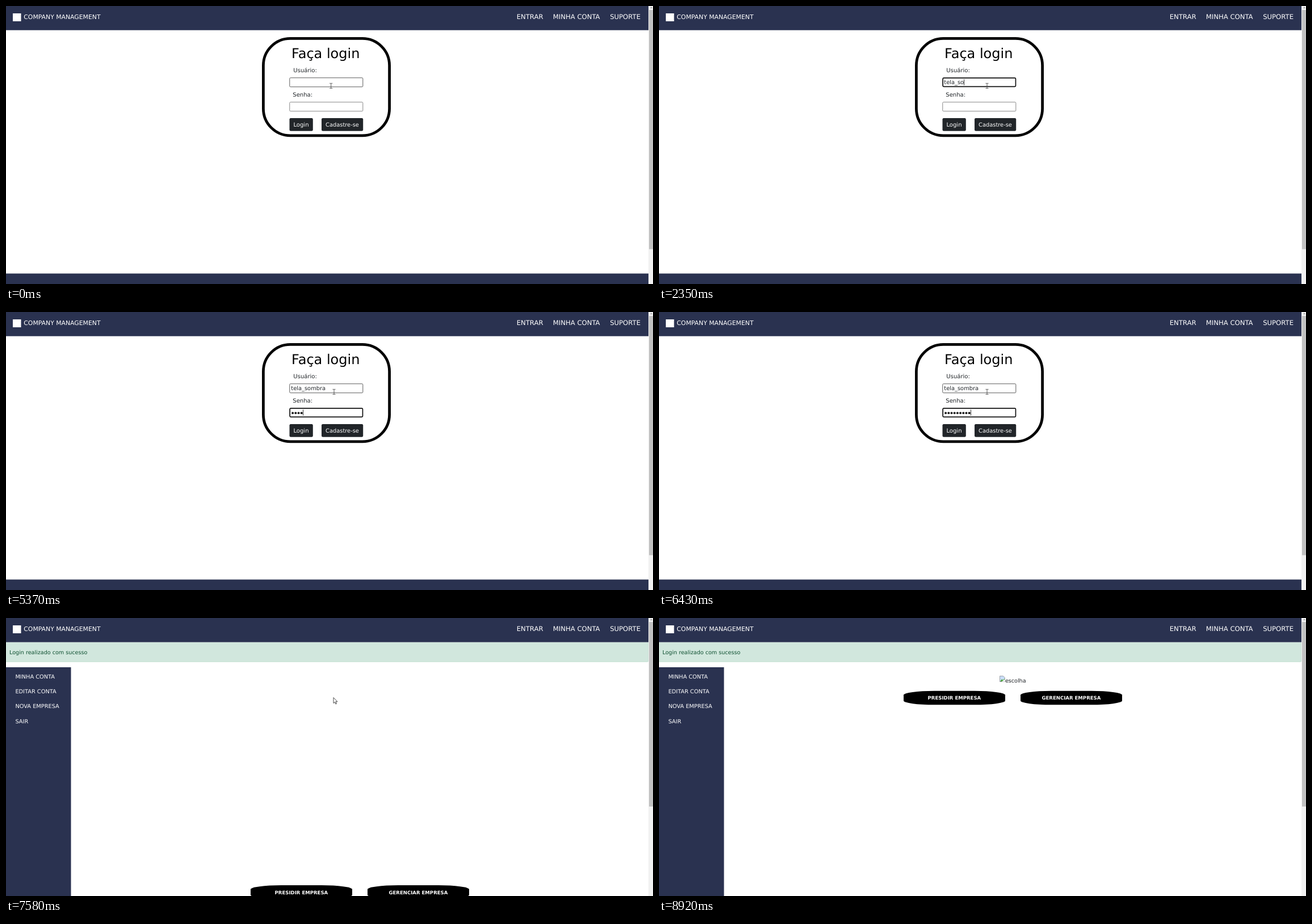
An HTML page that plays this animation: 1140 px wide and 491 px high, repeating every 9780 ms.

```html
<!DOCTYPE html>
<html lang="pt-BR">
<head>
<meta charset="utf-8">
<title>Company Management</title>
<style>
  html, body { margin: 0; width: 100%; height: 100%; overflow: hidden; background: #fff; }
  svg { display: block; width: 1140px; height: 491px; }
  text { font-family: "DejaVu Sans", Verdana, sans-serif; fill: #212529; text-rendering: geometricPrecision; white-space: pre; }
  .light { fill: #fff; }
  .navy { fill: #2a3250; }
  .dark { fill: #212529; }
  .strong { font-weight: bold; text-anchor: middle; }
  .field { fill: #fff; }
</style>
</head>
<body>
<svg viewBox="0 0 1140 491">
  <g id="login">
    <rect x="453.4" y="57.4" width="222.2" height="171.4" rx="47.6" fill="#fff" stroke="#000" stroke-width="4.8"/>
    <rect class="field" id="userBox"/>
    <rect class="field" id="passBox"/>
    <rect class="dark" x="499.5" y="198" width="41.3" height="22.8" rx="2.2"/>
    <rect class="dark" x="556" y="198" width="73.2" height="22.8" rx="2.2"/>
    <g id="dots"></g>
    <rect id="caret" y="129.3" width="0.8" height="10.6"/>
    <rect class="navy" y="472.5" width="1132" height="18.5"/>
  </g>

  <g id="account">
    <path d="M0 43H1132V75.5a2 2 0 0 1-2 2H0Z" fill="#d1e7dd"/>
    <path d="M0 77.3H1130a2 2 0 0 0 2-2V43" fill="none" stroke="#badbcc" stroke-width=".7"/>
    <rect class="navy" y="87" width="114.5" height="404"/>
    <g id="choices"></g>
    <g id="missing">
      <path d="M600.5 102.5h6l2.8 2.8v7.2h-8.8Z" fill="#c9ddf8" stroke="#8b8f94" stroke-width=".8"/>
      <path d="M601 112l3-4 2 1.7 3-2.7v1.5L604.5 112Z" fill="#4fa43c"/>
      <path d="M604 112.5l5.5-4.2v4.2Z" fill="#fff"/>
    </g>
  </g>

  <g id="header">
    <rect class="navy" width="1132" height="42.7"/>
    <rect class="light" x="12" y="13" width="14.5" height="14"/>
  </g>

  <rect x="1132" width="8" height="491" fill="#f1f1f1"/>
  <path d="M1134.8 4 1137 1.6 1139.2 4Z" fill="#a3a3a3"/>
  <rect id="thumb" x="1133" y="7" width="7" fill="#c1c1c1"/>

  <path id="beam" d="M-2.4-4.5H-.6L0-4 .6-4.5H2.4M0-4V4M-2.4 4.5H-.6L0 4 .6 4.5H2.4" fill="none" stroke="#444" stroke-width=".9"/>
  <path id="arrow" d="M0 0V10L2.3 7.9 3.9 11.5 5.5 10.8 3.9 7.3H7Z" fill="#fff" stroke="#111" stroke-width=".75"/>
</svg>
<script>
const LOOP = 9780;
const USER = "tela_sombra";
const FIELD_X = 502.3, DOT_PITCH = 5.2;

const userKeys = [940, 1070, 1270, 1470, 2020, 2280, 2350, 2550, 2750, 3020, 3240];
const passKeys = [4970, 5040, 5240, 5370, 5700, 5830, 6230, 6330, 6430];
const caretOff = [680, 1950, 3770, 4770, 6980];
const FOCUS_USER = 140, FOCUS_PASS = 4240, ARROW = 6760, LOGGED = 7580, IMAGE_FAILED = 7640;
const caretOn = [FOCUS_USER, ...userKeys, FOCUS_PASS, ...passKeys];

// [time, x, y]
const pointer = [
  [0, 572.7, 141], [70, 573.6, 141], [140, 575, 141], [210, 576.6, 141], [280, 577.4, 141], [350, 578, 141],
  [ARROW, 577, 140.5], [8780, 620, 174], [8850, 793, 293], [8920, -50, -50]
];

const $ = id => document.getElementById(id);

function add(parent, tag, attrs) {
  const node = document.createElementNS("http://www.w3.org/2000/svg", tag);
  for (const key in attrs) node.setAttribute(key, attrs[key]);
  return parent.appendChild(node);
}

function label(parent, x, y, size, content, attrs = {}) {
  const node = add(parent, "text", { x, y, "font-size": size, ...attrs });
  node.textContent = content;
  return node;
}

function set(node, attrs) {
  for (const key in attrs) node.setAttribute(key, attrs[key]);
}

const show = (node, visible) => { node.style.display = visible ? "" : "none"; };
const countUntil = (times, t) => times.filter(time => time <= t).length;
const lastBefore = (times, t) => times.reduce((last, time) => time <= t ? time : last, -1);

const light = { class: "light" };
label($("header"), 31.3, 23.3, 10.85, "COMPANY MANAGEMENT", light);
label($("header"), 899.7, 23.3, 11.65, "ENTRAR", light);
label($("header"), 963.8, 23.3, 11.65, "MINHA CONTA", light);
label($("header"), 1064.2, 23.3, 11.65, "SUPORTE", light);

const login = $("login");
label(login, 503.1, 92.2, 24, "Faça login", { style: "fill:#000" });
label(login, 506.3, 117, 10.05, "Usuário:");
label(login, 505.3, 160, 10.05, "Senha:");
label(login, 506.4, 213, 10.05, "Login", light);
label(login, 563.1, 213, 9.85, "Cadastre-se", light);
const typed = label(login, FIELD_X, 138.3, 9.9, "");
const dots = passKeys.map((_, i) =>
  add($("dots"), "circle", { cx: 502.5 + DOT_PITCH * (i + .5), cy: 178.4, r: 1.9 }));

const account = $("account");
label(account, 6, 64, 9.6, "Login realizado com sucesso", { style: "fill:#0f5132" });
["MINHA CONTA", "EDITAR CONTA", "NOVA EMPRESA", "SAIR"].forEach((item, i) =>
  label(account, 16.4, 106.9 + i * 26.2, 9.8, item, light));
label($("missing"), 609.9, 113.5, 9.6, "escolha");

[[431, "PRESIDIR EMPRESA"], [637, "GERENCIAR EMPRESA"]].forEach(([x, name]) => {
  add($("choices"), "rect", { x, y: 0, width: 179, height: 24.5, rx: 54, ry: 7.4 });
  label($("choices"), x + 89.4, 15.5, 8.55, name, { class: "light strong" });
});

function drawField(node, y, focused, idleColor) {
  const line = focused ? 1.7 : 1;
  set(node, {
    x: 499.3 + line / 2, y: y + line / 2, width: 130 - line, height: 17 - line, rx: 1.6,
    stroke: focused ? "#101010" : idleColor, "stroke-width": line
  });
}

function drawLogin(t) {
  const inPass = t >= FOCUS_PASS;
  drawField($("userBox"), 126.3, t >= FOCUS_USER && !inPass, "#5c5c5c");
  drawField($("passBox"), 169.3, inPass, "#858585");

  typed.textContent = USER.slice(0, countUntil(userKeys, t));
  const dotCount = countUntil(passKeys, t);
  dots.forEach((dot, i) => show(dot, i < dotCount));

  show($("caret"), lastBefore(caretOn, t) > lastBefore(caretOff, t));
  const textWidth = inPass ? dotCount * DOT_PITCH : typed.textContent ? typed.getComputedTextLength() : 0;
  set($("caret"), { x: FIELD_X + textWidth, y: inPass ? 172.3 : 129.3 });
}

function drawPointer(t) {
  const [, x, y] = pointer.filter(([time]) => time <= t).pop();
  const isArrow = t >= ARROW;
  show($("beam"), !isArrow);
  show($("arrow"), isArrow);
  set($(isArrow ? "arrow" : "beam"), { transform: `translate(${x} ${y})` });
}

function render(t) {
  const logged = t >= LOGGED, failed = t >= IMAGE_FAILED;
  show(login, !logged);
  show(account, logged);
  if (!logged) drawLogin(t);
  show($("missing"), failed);
  set($("choices"), { transform: `translate(0 ${failed ? 128.8 : 472})` });
  set($("thumb"), { height: logged ? 326 : 422.5 });
  drawPointer(t);
}

function tick() {
  render(performance.now() % LOOP);
  requestAnimationFrame(tick);
}
tick();
</script>
</body>
</html>
```
